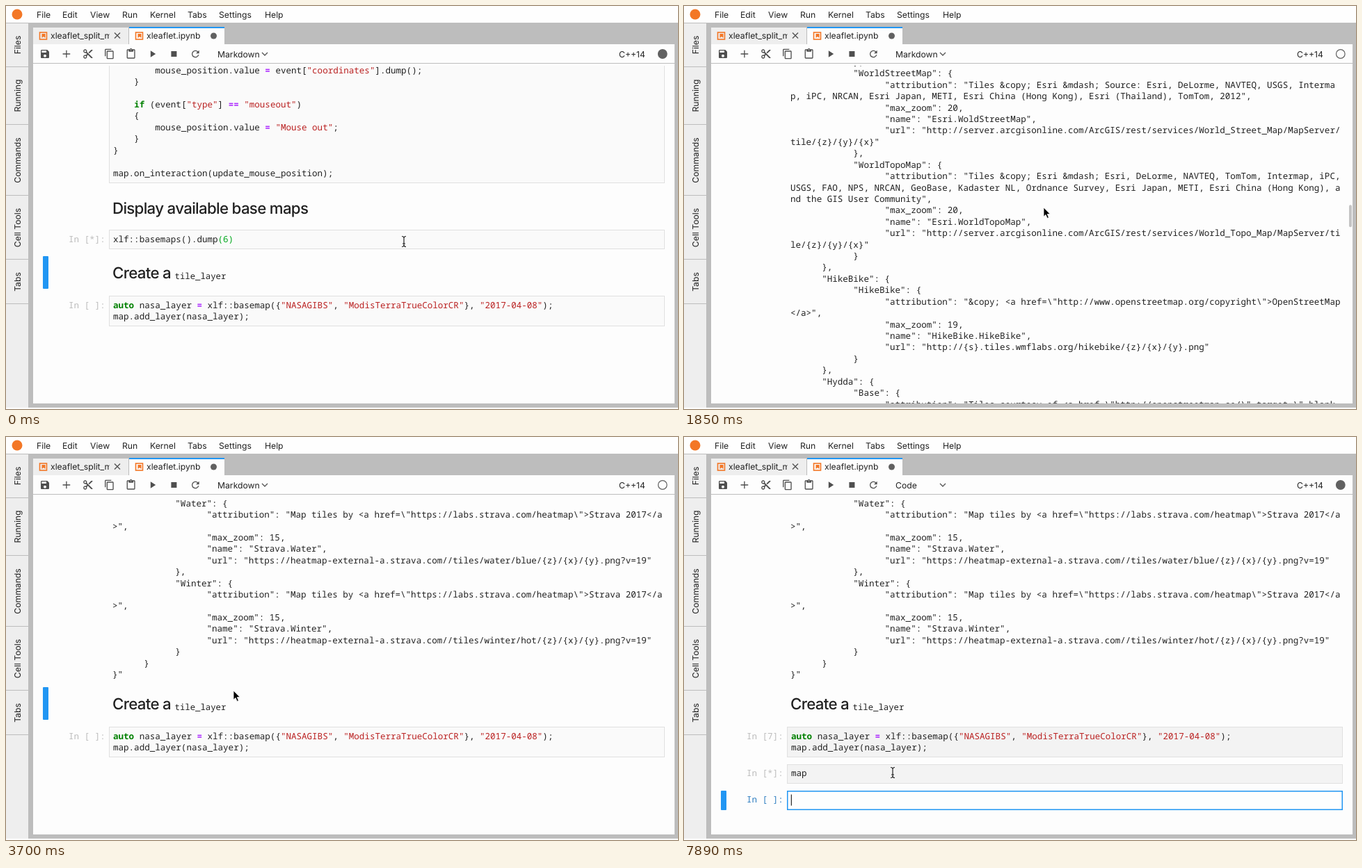
These frames come from a looping animation (966 px wide and 580 px high, 8 s). An HTML page:

```html
<!DOCTYPE html>
<html lang="en">
<head>
<meta charset="utf-8">
<title>Notebook</title>
<style>
  html, body { margin: 0; width: 100%; height: 100%; overflow: hidden; background: #fefefe; }
  body { position: relative; color: #212121; text-rendering: geometricPrecision; }
  svg, #view, #doc, #doc div, pre, .caret { position: absolute; }
  svg text { font: 12.2px Inter, sans-serif; fill: #212121; }
  #view { left: 39px; top: 86px; width: 922px; height: 486px; overflow: hidden; }
  #doc { left: -39px; top: -86px; }
  pre, .prompt, code { margin: 0; font: 12.55px/16.42px "Noto Sans Mono", monospace; white-space: pre; }
  .heading { left: 153px; font: 500 22.3px/30px Inter, sans-serif; letter-spacing: -.7px; white-space: pre; }
  .prompt { left: 90px; color: #bdbdbd; }
  .input { left: 148px; width: 799px; box-sizing: border-box; padding: 4.8px 5px;
           border: 1px solid #e0e0e0; background: #fafafa; }
  .input pre { position: static; }
  .ran .input { background: #f3f3f3; }
  .active .input { background: #fefefe; border-color: #2196f3; box-shadow: inset 0 0 0 .5px #2196f3; }
  .active .prompt { color: #307fc1; }
  pre b { color: #008000; }
  pre i { color: #ba2121; font-style: normal; }
  pre u { color: #aa22ff; font-weight: bold; text-decoration: none; }
  pre s { color: #00a81c; text-decoration: none; }
  #bar { left: 53px; width: 8px; border-radius: 1px; background: #2196f3; }
  #thumb { position: absolute; left: 956px; width: 4px; height: 32px; border-radius: 2px; background: #c4c4c4; }
  .caret { width: 1.3px; height: 16px; background: #000; }
</style>
</head>
<body>
<svg id="chrome" width="966" height="580"></svg>
<div id="view"><div id="doc">
  <div id="before"></div>
  <pre id="output"></pre>
  <div id="after"></div>
</div></div>
<div id="thumb"></div>
<svg width="966" height="580">
  <path id="arrow" d="M0 0V13.2L3 10.4 5.2 15.4 7.4 14.4 5.2 9.6H9.3Z" stroke="#fff" stroke-width=".8"/>
  <path id="beam" d="M-3-7.5Q0-7.5 0-5Q0-7.5 3-7.5M0-6V6M-3 7.5Q0 7.5 0 5Q0 7.5 3 7.5M-2 3H2" fill="none" stroke="#222" stroke-width="1.2"/>
</svg>
<script>
const $ = id => document.getElementById(id);
const LINE = 16.42, CHAR = 7.53, COLUMNS = 105, LOOP = 8000;

// ---- Window frame -------------------------------------------------------
const rect = (x, y, w, h, fill) => `<rect x="${x}" y="${y}" width="${w}" height="${h}" fill="${fill}"/>`;
const text = (x, y, s, extra = '') => `<text x="${x}" y="${y}" ${extra}>${s}</text>`;
const notebookIcon = x => `<rect x="${x}" y="38" width="10" height="10" fill="none" stroke="#f37726" stroke-width="1.6"/>
  <path d="M${x + 3} 40h5v6l-2.5-2-2.5 2z" fill="#f37726"/>`;

const menus = { File: 44, Edit: 81, View: 121, Run: 167, Kernel: 207, Tabs: 261, Settings: 306, Help: 372 };
const sideTabs = { Files: [56, 87], Running: [129, 170], Commands: [222, 272], 'Cell Tools': [319, 364], Tabs: [397, 428] };
const toolIcons = [
  'M17 3H5c-1.11 0-2 .9-2 2v14c0 1.1.89 2 2 2h14c1.1 0 2-.9 2-2V7l-4-4zm-5 16c-1.66 0-3-1.34-3-3s1.34-3 3-3 3 1.34 3 3-1.34 3-3 3zm3-10H5V5h10v4z',
  'M20 13h-7v7h-2v-7H4v-2h7V4h2v7h7z',
  'M9.64 7.64A4 4 0 1 0 7.64 9.64L10 12l-2.36 2.36A4 4 0 1 0 9.64 16.36L12 14l7 7h3v-1zM6 8a2 2 0 1 1 0-4 2 2 0 0 1 0 4zm0 12a2 2 0 1 1 0-4 2 2 0 0 1 0 4zM19 3l-6 6 2 2 7-7V3z',
  'M16 1H4c-1.1 0-2 .9-2 2v14h2V3h12V1zm3 4H8c-1.1 0-2 .9-2 2v14c0 1.1.9 2 2 2h11c1.1 0 2-.9 2-2V7c0-1.1-.9-2-2-2zm0 16H8V7h11v14z',
  'M19 2h-4.18a3 3 0 0 0-5.64 0H5c-1.1 0-2 .9-2 2v16c0 1.1.9 2 2 2h14c1.1 0 2-.9 2-2V4c0-1.1-.9-2-2-2zm-7 0a1 1 0 1 1 0 2 1 1 0 0 1 0-2zm7 18H5V4h2v3h10V4h2v16z',
  'M8 5v14l11-7z',
  'M6 6h12v12H6z',
  'M17.65 6.35A8 8 0 1 0 19.73 14h-2.08A6 6 0 1 1 16.22 7.78L13 11h7V4z'
];

$('chrome').innerHTML =
  rect(0, 24, 966, 554, '#bdbdbd') + rect(0, 25, 32, 553, '#eee') +
  '<circle cx="16" cy="12" r="7.5" fill="#f37726"/>' +
  Object.entries(menus).map(([s, x]) => text(x, 16.5, s)).join('') +
  Object.entries(sideTabs).map(([s, [y, end]]) => rect(0, end, 32, 1, '#bdbdbd') +
    text(0, 0, s, `transform="translate(21 ${y}) rotate(-90)" text-anchor="middle"`)).join('') +
  rect(39, 31, 137, 24, '#eee') + rect(177, 30, 137, 26, '#fdfdfd') + rect(177, 30, 137, 2, '#2196f3') +
  rect(39, 55, 922, 27, '#fdfdfd') + rect(39, 83, 922, 489, '#fdfdfd') +
  rect(177, 54, 137, 2, '#fdfdfd') +
  notebookIcon(48.5) + notebookIcon(186.5) +
  `<svg x="64" y="31" width="84.5" height="24">${text(0, 16, 'xleaflet_split_map')}</svg>` +
  text(202, 47, 'xleaflet.ipynb') +
  '<path d="M156 38.5l8 8m0-8l-8 8" stroke="#555" stroke-width="1.4"/><circle cx="298.5" cy="43" r="4.5" fill="#616161"/>' +
  toolIcons.map((d, i) => `<path d="${d}" fill="#4f4f4f" fill-rule="evenodd" transform="translate(${48 + 30.9 * i} 61) scale(.667)"/>`).join('') +
  text(304, 73.5, '', 'id="mode"') +
  '<path d="M368 67l4 4 4-4" fill="none" stroke="#555" stroke-width="1.3"/>' +
  text(881, 73.5, 'C++14') +
  '<circle id="kernel" cx="943.8" cy="69" r="6.3" stroke="#616161" stroke-width="1.2"/>';

// ---- Printed base maps --------------------------------------------------
const link = (url, label, extra = '') => `<a href="${url}"${extra}>${label}</a>`;
const blank = ' target="_blank"', zxy = '{z}/{x}/{y}.png', copy = '&copy; ', dash = ' &mdash; ';
const osm = link('http://www.openstreetmap.org/copyright', 'OpenStreetMap');
const tile = (name, max_zoom, url, attribution) => ({ attribution, max_zoom, name, url });
const group = (name, make, keys) =>
  Object.fromEntries(keys.map(key => [key, tile(`${name}.${key}`, ...make(key))]));

const carto = (key, style) => tile(`CartoDB.${key}`, 20, `http://c.basemaps.cartocdn.com/${style}/${zxy}`,
  copy + osm + ' ' + copy + link('http://cartodb.com/attributions', 'CartoDB'));
const esri = (name, zoom, service, credit) => tile(`Esri.${name}`, zoom,
  `http://server.arcgisonline.com/ArcGIS/rest/services/${service}/MapServer/tile/{z}/{y}/{x}`,
  `Tiles &copy; Esri${dash}${credit}`);
const hydda = key => [18, `http://{s}.tile.openstreetmap.se/hydda/${key.toLowerCase()}/${zxy}`,
  `Tiles courtesy of ${link('http://openstreetmap.se/', 'OpenStreetMap Sweden', blank)}${dash}Map data ${copy}${osm}`];
const gibs = key => {
  const [, sensor, craft, product] = key.match(/^(Modis|Viirs)(Terra|Aqua)?(.*?)(CR)?$/);
  const layer = [sensor.toUpperCase(), craft || 'SNPP', 'CorrectedReflectance', product].join('_');
  return [9, `https://gibs.earthdata.nasa.gov/wmts/epsg3857/best/${layer}/default/%s/GoogleMapsCompatible_Level9/{z}/{y}/{x}.jpg`,
    'Imagery provided by services from the Global Imagery Browse Services (GIBS), operated by the NASA/GSFC/Earth Science Data and Information System (' +
    link('https://earthdata.nasa.gov', 'ESDIS') + ') with funding provided by NASA/HQ.'];
};
const surfer = key => [20, `http://korona.geog.uni-heidelberg.de/tiles/${key.toLowerCase()}/x={x}&y={y}&z={z}`,
  `Imagery from ${link('http://giscience.uni-hd.de/', 'GIScience Research Group @ University of Heidelberg')}${dash}Map data ${copy}${osm}`];
const street = (key, zoom, url, credit = copy + osm) => tile(`OpenStreetMap.${key}`, zoom, url + zxy, credit);
const stamen = key => [key === 'Watercolor' ? 16 : 20, `https://stamen-tiles-a.a.ssl.fastly.net/${key.toLowerCase()}/${zxy}`,
  `Map tiles by ${link('http://stamen.com/', 'Stamen Design')}, ${link('http://creativecommons.org/licenses/by/3.0', 'CC BY 3.0')}${dash}Map data ${copy}${osm}`];
const heat = { All: 'hot', Ride: 'hot', Run: 'bluered', Water: 'blue', Winter: 'hot' };
const strava = key => [15, `https://heatmap-external-a.strava.com//tiles/${key.toLowerCase()}/${heat[key]}/${zxy}?v=19`,
  `Map tiles ${key === 'Ride' ? '' : 'by '}${link('https://labs.strava.com/heatmap', 'Strava 2017')}`];

const maps = {
  CartoDB: { DarkMatter: carto('DarkMatter', 'dark_all'), Positron: carto('Positron', 'light_all') },
  Esri: {
    DeLorme: esri('DeLorme', 11, 'Specialty/DeLorme_World_Base_Map', 'Copyright: &copy;2012 DeLorme'),
    NatGeoWorldMap: esri('NatGeoWorldMap', 16, 'NatGeo_World_Map',
      'National Geographic, Esri, DeLorme, NAVTEQ, UNEP-WCMC, USGS, NASA, ESA, METI, NRCAN, GEBCO, NOAA, iPC'),
    WorldImagery: esri('WorldImagery', 20, 'World_Imagery',
      'Source: Esri, i-cubed, USDA, USGS, AEX, GeoEye, Getmapping, Aerogrid, IGN, IGP, UPR-EGP, and the GIS User Community'),
    WorldStreetMap: esri('WoldStreetMap', 20, 'World_Street_Map',
      'Source: Esri, DeLorme, NAVTEQ, USGS, Intermap, iPC, NRCAN, Esri Japan, METI, Esri China (Hong Kong), Esri (Thailand), TomTom, 2012'),
    WorldTopoMap: esri('WorldTopoMap', 20, 'World_Topo_Map',
      'Esri, DeLorme, NAVTEQ, TomTom, Intermap, iPC, USGS, FAO, NPS, NRCAN, GeoBase, Kadaster NL, Ordnance Survey, Esri Japan, METI, Esri China (Hong Kong), and the GIS User Community')
  },
  HikeBike: { HikeBike: tile('HikeBike.HikeBike', 19, 'http://{s}.tiles.wmflabs.org/hikebike/' + zxy, copy + osm) },
  Hydda: group('Hydda', hydda, ['Base', 'Full']),
  MtbMap: tile('MtbMap', 18, 'http://tile.mtbmap.cz/mtbmap_tiles/' + zxy, `${copy}${osm} &amp; USGS`),
  NASAGIBS: group('NASAGIBS', gibs, ['ModisAquaBands721CR', 'ModisAquaTrueColorCR', 'ModisTerraBands367CR',
    'ModisTerraBands721CR', 'ModisTerraTrueColorCR', 'ViirsEarthAtNight2012']),
  OpenMapSurfer: group('OpenMapSurfer', surfer, ['Grayscale', 'Roads']),
  OpenStreetMap: {
    BlackAndWhite: street('BlackAndWhite', 18, 'http://{s}.tiles.wmflabs.org/bw-mapnik/'),
    DE: street('DE', 18, 'http://{s}.tile.openstreetmap.de/tiles/osmde/'),
    France: street('France', 20, 'http://{s}.tile.openstreetmap.fr/osmfr/', `${copy}Openstreetmap France | ${copy}${osm}`),
    HOT: street('HOT', 19, 'http://{s}.tile.openstreetmap.fr/hot/',
      `${copy}${osm}, Tiles courtesy of ${link('http://hot.openstreetmap.org/', 'Humanitarian OpenStreetMap Team', blank)}`),
    Mapnik: street('Mapnik', 19, 'https://{s}.tile.openstreetmap.org/',
      `Map data (c) ${link('https://openstreetmap.org', 'OpenStreetMap')} contributors`)
  },
  OpenTopoMap: tile('OpenTopoMap', 17, 'http://{s}.tile.opentopomap.org/' + zxy,
    `Map data: ${copy}${osm}, ${link('http://viewfinderpanoramas.org', 'SRTM')} | Map style: ${copy}` +
    `${link('https://opentopomap.org', 'OpenTopoMap')} (${link('https://creativecommons.org/licenses/by-sa/3.0/', 'CC-BY-SA')})`),
  Stamen: group('Stamen', stamen, ['Terrain', 'Toner', 'Watercolor']),
  Strava: group('Strava', strava, Object.keys(heat))
};

// Lines break anywhere except in front of closing punctuation.
function wrap(line) {
  const rows = [];
  while (line.length > COLUMNS) {
    let n = COLUMNS;
    while (/[.,;:!?)}\/"]/.test(line[n])) n--;
    rows.push(line.slice(0, n));
    line = line.slice(n).trimStart();
  }
  return [...rows, line];
}
const rows = `"${JSON.stringify(maps, null, 6)}"`.split('\n').flatMap(wrap);
const outputHeight = rows.length * LINE;
$('output').textContent = rows.join('\n');
$('output').style.cssText = 'left:153px;top:350px';

// ---- Cells --------------------------------------------------------------
const cell = (id, y, prompt, code) => `<div id="${id}" style="top:${y}px">
  <div class="prompt" style="top:5.8px">${prompt}</div><div class="input"><pre>${code}</pre></div></div>`;
const heading = (y, s) => `<div class="heading" style="top:${y - 15}px">${s}</div>`;

$('before').innerHTML = cell('handler', 62.5, '', `    {
        mouse_position.value <u>=</u> event[<i>"coordinates"</i>].dump();
    }

    <b>if</b> (event[<i>"type"</i>] <u>==</u> <i>"mouseout"</i>)
    {
        mouse_position.value <u>=</u> <i>"Mouse out"</i>;
    }
}

map.on_interaction(update_mouse_position);`) +
  heading(292, 'Display available base maps') +
  cell('dump', 322, '', 'xlf::basemaps().dump<s>(6)</s>');

$('after').innerHTML = '<div id="bar"></div>' + heading(385, 'Create a') +
  '<pre style="left:242.5px;top:381px;font-size:12.3px">tile_layer</pre>' +
  cell('layer', 417, '', `<b>auto</b> nasa_layer <u>=</u> xlf::basemap({<i>"NASAGIBS"</i>, <i>"ModisTerraTrueColorCR"</i>}, <i>"2017-04-08"</i>);
map.add_layer(nasa_layer);`) +
  cell('show', 470.5, '', ' ') + cell('next', 508.5, 'In [ ]:', ' ') + '<div class="caret" id="caret"></div>';

// ---- Timeline -----------------------------------------------------------
// Motion is sampled in bursts: [first step, last step, number of steps].
const bursts = [[120, 230, 2], [1010, 1700, 9], [1850, 2630, 10], [2720, 3170, 6],
  [3440, 3930, 8], [5500, 5650, 3], [6060, 6210, 3], [6440, 6670, 4]];
// Steps fall on whole hundredths of a second.
function snap(t) {
  const burst = bursts.filter(b => b[0] <= t).pop();
  if (!burst) return 0;
  const [start, end, n] = burst;
  let step = start;
  for (let i = 1; i < n; i++) {
    const next = Math.round((start + (end - start) * i / (n - 1)) / 10) * 10;
    if (next <= t) step = next;
  }
  return step;
}
function follow(keys, t, i = 1) {
  const k = keys.findIndex(key => key[0] > t);
  if (k < 0) return keys[keys.length - 1][i];
  if (k === 0) return keys[0][i];
  const a = keys[k - 1], b = keys[k];
  return a[i] + (b[i] - a[i]) * (t - a[0]) / (b[0] - a[0]);
}
const mix = (a, b, f) => a + (b - a) * f;

// Scroll offset that puts the centre of a printed row at height y.
const rowAt = (key, y) => 358.7 + LINE * rows.findIndex(r => r.trim() === `"${key}": {`) - y;
const imagery = rowAt('WorldImagery', 209), bike = rowAt('HikeBike', 393.5),
  mapnik = rowAt('Mapnik', 398), ride = rowAt('Ride', 163.3);
const scrollKeys = [[930, 0], [1100, imagery * .35], [1360, imagery], [1530, mix(imagery, bike, .7)],
  [1700, bike - 15], [1850, bike], [1940, mix(bike, mapnik, .14)], [2200, mix(bike, mapnik, .72)],
  [2370, mapnik], [2630, mix(mapnik, ride, .35)], [2720, mix(mapnik, ride, .45)], [2900, ride],
  [2990, mix(ride, outputHeight, .6)], [3170, outputHeight]];
const mouseKeys = [[0, 572, 339], [120, 545, 315], [230, 517, 290], [3370, 517, 290], [3650, 327, 365],
  [3930, 386, 445], [5420, 386, 445], [5650, 462, 268], [5980, 462, 268], [6210, 305, 508],
  [6370, 305, 508], [6670, 300, 483]];

const show = (el, on) => { el.style.visibility = on ? 'visible' : 'hidden'; };
const place = (el, x, y) => { el.style.transform = `translate(${x}px, ${y}px)`; };
const setPrompt = (id, s) => { $(id).querySelector('.prompt').textContent = `In [${s}]:`; };
const between = (t, ...spans) => spans.some(([a, b]) => t >= a && t < b);

function draw(t) {
  const s = snap(t), scroll = Math.round(follow(scrollKeys, s) * 10) / 10;
  const printed = t >= 120, clicked = t >= 4080, ran = t >= 5150, shown = t >= 7890;

  place($('doc'), 0, -scroll);
  place($('after'), 0, printed ? outputHeight : 0);
  show($('output'), printed);
  show($('thumb'), between(t, [1010, 3170]));
  place($('thumb'), 0, 536 - (outputHeight - scroll) / 14.4);

  setPrompt('dump', printed ? 6 : '*');
  setPrompt('layer', t >= 5890 ? 7 : ran ? '*' : ' ');
  setPrompt('show', shown ? '*' : ' ');
  $('layer').className = ran ? 'ran' : clicked ? 'active' : '';
  $('show').className = shown ? 'ran' : 'active';
  $('next').className = 'active';
  show($('show'), ran);
  show($('next'), shown);

  const typed = 'map'.slice(0, t < 7390 ? 0 : 1 + Math.floor((t - 7390) / 90));
  $('show').querySelector('pre').textContent = typed || ' ';

  const [top, height] = shown ? [509, 28] : ran ? [471, 28] : clicked ? [417, 44] : [360, 47];
  $('bar').style.cssText = `top:${top}px;height:${height}px`;
  show($('caret'), between(t, [4080, 4610], [5150, 5650], [6210, 6670], [6850, LOOP]));
  if (ran) place($('caret'), 153.8 + (shown ? 0 : typed.length * CHAR), shown ? 514.5 : 476.5);
  else place($('caret'), 350, 439);

  $('mode').textContent = clicked ? 'Code' : 'Markdown';
  $('kernel').setAttribute('fill', between(t, [0, 230], [5150, 5890], [7890, LOOP]) ? '#616161' : '#fdfdfd');

  const x = follow(mouseKeys, s, 1), y = follow(mouseKeys, s, 2);
  const overCode = scroll ? between(y, [417, 461], [471, 499]) : between(y, [322, 350]);
  show($('beam'), overCode);
  show($('arrow'), !overCode);
  place($('beam'), x, y);
  place($('arrow'), x, y);
}

function tick() {
  draw(performance.now() % LOOP);
  requestAnimationFrame(tick);
}
tick();
</script>
</body>
</html>
```
